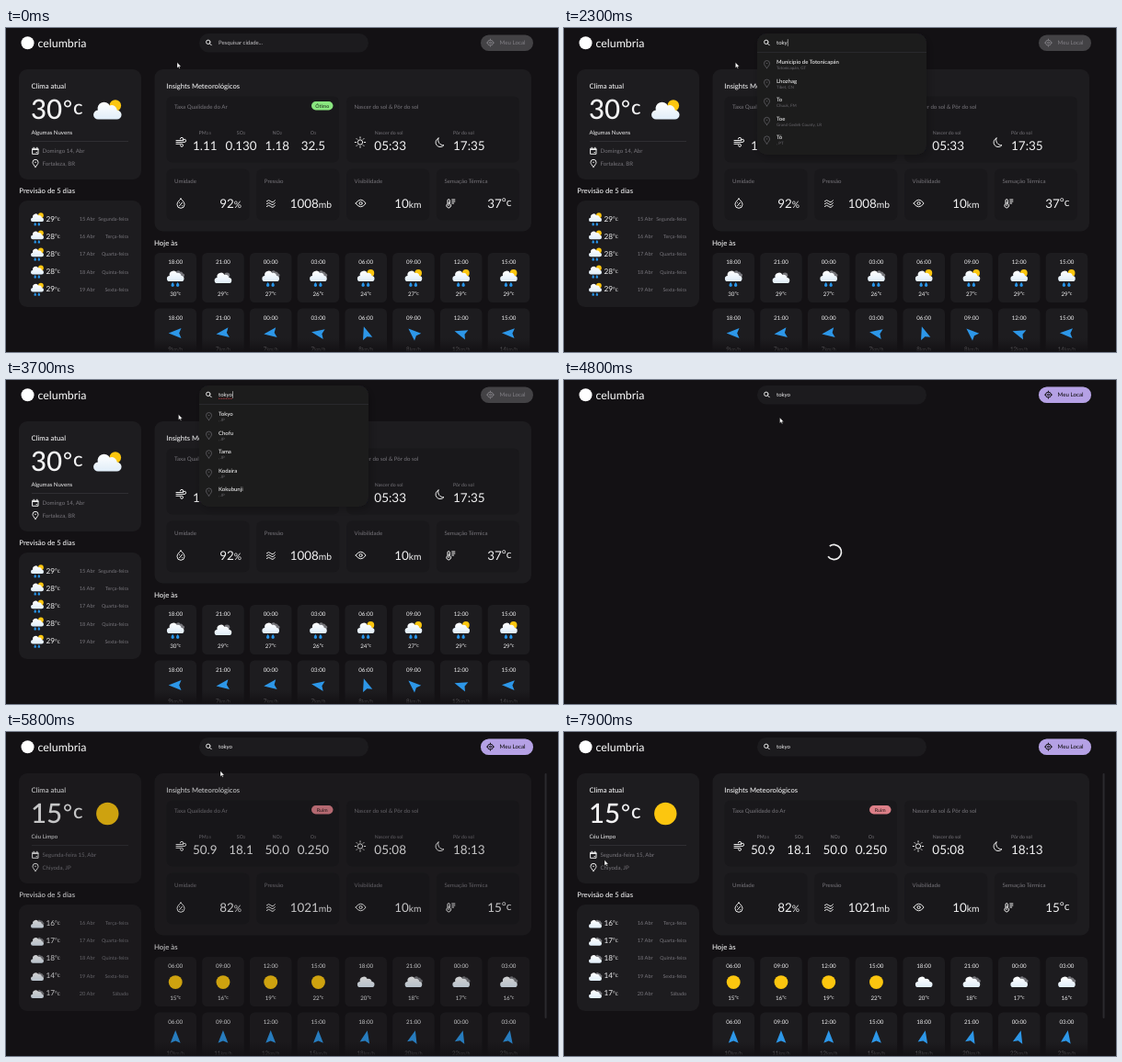
An HTML page for the animation above (8000 ms loop, 600x353 px).

```html
<!DOCTYPE html>
<html lang="pt">
<head>
<meta charset="utf-8">
<title>Clima</title>
<style>
html, body { margin: 0; height: 100%; overflow: hidden; background: #131114; }
svg { display: block; width: 100vw; height: 100vh; font-family: Lato, "Open Sans", sans-serif; text-rendering: geometricPrecision; }
.line { fill: none; stroke: #eee; stroke-width: 1; stroke-linecap: round; stroke-linejoin: round; }
</style>
</head>
<body>
<svg id="stage" viewBox="0 0 600 353"></svg>
<script>
const GREY = '#77757b', WHITE = '#f2f2f3', CARD = '#1d1c1f', INNER = '#19181b';
const $ = id => document.getElementById(id);

const text = (x, y, s, size = 6.1, fill = WHITE, more = '') =>
  `<text x="${x}" y="${y}" font-size="${size}" fill="${fill}" ${more}>${s}</text>`;
const mid = 'text-anchor="middle" ', end = 'text-anchor="end" ', bold = 'font-weight="500" ';
const box = (x, y, w, h, r, fill, more = '') =>
  `<rect x="${x}" y="${y}" width="${w}" height="${h}" rx="${r}" fill="${fill}" ${more}/>`;
const dot = (x, y, r, fill) => `<circle cx="${x}" cy="${y}" r="${r}" fill="${fill}"/>`;
const unit = (s, size, up = 0) => `<tspan font-size="${size}" dy="${-up}">${s}</tspan>`;
const icon = (x, y, d, more = '') => `<path class="line" transform="translate(${x} ${y})" d="${d}" ${more}/>`;
const ring = r => `<circle r="${r}" class="line" pathLength="100" stroke-dasharray="75 25" transform="rotate(-45)" style="stroke-linecap:butt;stroke-width:${r / 4.6}"/>`;

const PIN = 'M0 4C-2 1.5-3 .3-3-1.2a3 3 0 0 1 6 0C3 .3 2 1.5 0 4zM-.4-1.2h.8';
const GLYPH = {
  search: 'M2.8 2.8L1 1M1.5-.7a2.2 2.2 0 1 1-4.4 0 2.2 2.2 0 0 1 4.4 0',
  locate: 'M3 0a3 3 0 1 1-6 0 3 3 0 0 1 6 0M1 0a1 1 0 1 1-2 0 1 1 0 0 1 2 0M0-4v1M0 3v1M-4 0h1M3 0h1',
  date: 'M-3-2.7h6v6h-6zM-3-1.5h6M-1.8-3.8v1M1.8-3.8v1M1 1.6h.6',
  wind: 'M-5-1.5h6a1.6 1.6 0 1 0-1.6-1.6M-5 .4h9a1.6 1.6 0 1 0-1.6-1.6M-5 2.3h6a1.5 1.5 0 1 1-1.5 1.5',
  sun: 'M2.7 0a2.7 2.7 0 1 1-5.4 0 2.7 2.7 0 0 1 5.4 0M0-5.7v1.2M0 4.5v1.2M-5.7 0h1.2M4.5 0h1.2M-4-4l.8.8M3.2 3.2l.8.8M4-4l-.8.8M-3.2 3.2l-.8.8',
  moon: 'M-1-5A5 5 0 1 0 5 2.6 5.6 5.6 0 0 1-1-5z',
  drop: 'M0-5C2.8-2.3 4-.6 4 1.3a4 4 0 0 1-8 0C-4-.6-2.8-2.3 0-5zM-1.5 2.8l3-3.6M-1.5-.7h.1M1.5 2.6h.1',
  waves: [-2.8, 0, 2.8].map(y => `M-4.5 ${y + .6}q2.2-2.4 4.5 0t4.5-1`).join(''),
  eye: 'M-5.5 0Q-3-3.8 0-3.8T5.5 0Q3 3.8 0 3.8T-5.5 0M1.6 0a1.6 1.6 0 1 1-3.2 0 1.6 1.6 0 0 1 3.2 0',
  thermo: 'M-3.4 .4v-3.6a1.2 1.2 0 0 1 2.4 0v3.6a2.4 2.4 0 1 1-2.4 0M-2.2-1v3.6M1.3-4h3.2M1.3-2h3.2M1.3 0h2'
};

const CLOUD = 'M-10 10a5 5 0 0 1-.5-10A7 7 0 0 1 2.5-5 6 6 0 0 1 10.5 0 5 5 0 0 1 10 10z';
const cloud = (fill, more = '') => `<path d="${CLOUD}" fill="${fill}" ${more}/>`;
const front = cloud('url(#cloud)');
const drops = [-5, 4].map(x => `<path d="M${x} 11.5c4 4.5 3.2 8 0 8s-4-3.5 0-8" fill="#2795ea"/>`).join('');
const behind = cloud('#77777c', 'transform="translate(7 -4) scale(.6)"');
const sunny = dot(8.5, -5, 6.3, '#fcc60f');
const SKY = {
  clear: dot(0, 1, 12.2, '#fcc60f'),
  cloud: front,
  broken: behind + front,
  fewDay: sunny + front,
  fewNight: dot(7, -4, 5, '#77777c') + front,
  rainDay: sunny + front + drops,
  rainNight: behind + front + drops
};
const sky = (kind, x, y, scale) => `<g transform="translate(${x} ${y}) scale(${scale})">${SKY[kind]}</g>`;

function page(d) {
  let s = [[14, 45, 133, 120], [14, 188, 133, 116], [161.5, 45, 409.5, 176.5]]
    .map(b => box(...b, 9, CARD)).join('');

  // current weather
  s += text(27.5, 66.2, 'Clima atual', 7.7, WHITE, bold)
    + text(27, 99.3, d.temp, 29.5, WHITE, bold) + text(62, 95.5, '°', 24, WHITE, bold) + text(73, 93.5, 'c', 22, WHITE, bold)
    + sky(d.sky, 110.3, d.sky == 'clear' ? 88 : 89.5, 1)
    + text(27.5, 116, d.desc, 6.1) + box(28, 123, 105, .8, 0, '#343337')
    + icon(32, 134, GLYPH.date) + text(39.5, 136.3, d.date, 6.15, GREY)
    + icon(32, 147.5, PIN) + text(39.5, 149.7, d.place, 6.15, GREY);

  // five day forecast
  s += text(14.3, 180, 'Previsão de 5 dias', 7.7, WHITE, bold);
  d.days.forEach((temp, i) => {
    const y = 208 + 19.1 * i;
    s += sky(d.daySky, 34, d.daySky == 'broken' ? y + 1 : y - 1.5, .46)
      + text(43.5, y + 2.9, temp + unit('°c', 6.5, .8), 8.2)
      + text(79.7, y + 2.2, `${d.first + i} Abr`, 5.7, GREY)
      + text(133, y + 2.2, d.names[i], 5.4, GREY, end);
  });

  // insights
  s += text(174.3, 66.2, 'Insights Meteorológicos', 7.6, WHITE, bold)
    + box(174.5, 74.5, 187.5, 72, 6, INNER) + box(370, 74.5, 188, 72, 6, INNER)
    + text(183, 87.7, 'Taxa Qualidade do Ar', 6.2, GREY)
    + text(378.5, 87.7, 'Nascer do sol &amp; Pôr do sol', 6.1, GREY)
    + box(332, 80, 23.5, 9.4, 4.7, d.badge[1]) + text(343.7, 86.5, d.badge[0], 5.3, d.badge[2], mid + bold)
    + icon(190, 124, GLYPH.wind);
  ['PM' + unit('2.5', 3.8), 'SO' + unit('2', 3.8), 'NO' + unit('2', 3.8), 'O' + unit('3', 3.8)].forEach((label, i) => {
    const x = 216.3 + 39.2 * i;
    s += text(x, 115.5, label, 5.3, GREY, mid) + text(x, 133, d.air[i], 13.4, WHITE, mid);
  });
  s += icon(385, 124.5, GLYPH.sun) + text(400.8, 116.3, 'Nascer do sol', 5.2, GREY) + text(400.3, 133, d.sun[0], 13.5)
    + icon(471, 125, GLYPH.moon) + text(486, 116.3, 'Pôr do sol', 5.2, GREY) + text(486, 133, d.sun[1], 13.5);
  [['Umidade', 'drop', '%', 256], ['Pressão', 'waves', 'mb', 354], ['Visibilidade', 'eye', 'km', 451.5], ['Sensação Térmica', 'thermo', '°c', 549.5]]
    .forEach(([label, glyph, u, right], i) => {
      const x = 174.5 + 97.8 * i;
      s += box(x, 153.5, 90, 56, 6, INNER) + text(x + 8.5, 169, label, 6.1, GREY)
        + icon(x + 15.5, 191, GLYPH[glyph])
        + text(right, 195.7, d.stats[i] + unit(u, u == '°c' ? 12 : 10.3, u == '°c' ? 1.6 : 0), 13.4, WHITE, end);
    });

  // hourly
  s += text(161, 237, 'Hoje às', 7.8, WHITE, bold);
  d.temps.forEach((temp, i) => {
    const x = 184.2 + 51.75 * i;
    const hour = String((d.hour + 3 * i) % 24).padStart(2, '0') + ':00';
    const kind = d.skies[i];
    s += box(x - 22.8, 245, 45.6, 54, 5.5, CARD) + box(x - 22.8, 305.5, 45.6, 54, 5.5, CARD)
      + text(x, 257.3, hour, 6.2, WHITE, mid) + text(x, 317.5, hour, 6.2, WHITE, mid)
      + sky(kind, x, kind.startsWith('rain') ? 270 : 272, .61)
      + text(x, 291.7, temp + unit('°c', 5.4, .5), 6.2, WHITE, mid)
      + `<path d="M0-7.5L5.4 6.3 0 4-5.4 6.3z" fill="#2d97e8" transform="translate(${x} 332.5) rotate(${d.wind[i]})"/>`
      + text(x, 351.8, d.speed[i] + unit('km/h', 5.2), 6.2, WHITE, mid);
  });
  return s;
}

const WEEK = ['Segunda', 'Terça', 'Quarta', 'Quinta', 'Sexta'].map(n => n + '-feira');
const local = {
  temp: 30, sky: 'fewDay', desc: 'Algumas Nuvens', date: 'Domingo 14, Abr', place: 'Fortaleza, BR',
  days: [29, 28, 28, 28, 29], names: WEEK, first: 15, daySky: 'rainDay',
  badge: ['Ótimo', '#89e57f', '#1f331f'], air: ['1.11', '0.130', '1.18', '32.5'], sun: ['05:33', '17:35'],
  stats: [92, 1008, 10, 37], hour: 18, temps: [30, 29, 27, 26, 24, 27, 29, 29],
  skies: ['rainNight', 'fewNight', 'rainNight', 'rainNight', 'rainDay', 'rainDay', 'rainDay', 'rainDay'],
  wind: [-90, -98, -98, -80, -18, -48, -72, -88], speed: [9, 7, 7, 7, 8, 8, 12, 14]
};
const remote = {
  temp: 15, sky: 'clear', desc: 'Céu Limpo', date: 'Segunda-feira 15, Abr', place: 'Chiyoda, JP',
  days: [16, 17, 18, 14, 17], names: [...WEEK.slice(1), 'Sábado'], first: 16, daySky: 'broken',
  badge: ['Ruim', '#dc7f88', '#331f1f'], air: ['50.9', '18.1', '50.0', '0.250'], sun: ['05:08', '18:13'],
  stats: [82, 1021, 10, 15], hour: 6, temps: [15, 16, 19, 22, 20, 18, 17, 16],
  skies: ['clear', 'clear', 'clear', 'clear', 'cloud', 'broken', 'broken', 'broken'],
  wind: [0, 0, 0, 0, 12, 15, 15, 10], speed: [10, 11, 12, 15, 18, 20, 22, 23]
};

const list = rows => rows.map(([name, place], i) => {
  const y = 39 + 20.6 * i;
  return icon(220.5, y + .7, PIN, 'style="stroke:#6c6a70;stroke-width:.7"')
    + text(231, y, name, 6, WHITE, bold) + text(231, y + 6, place, 4.5, '#68666c');
}).join('');

$('stage').innerHTML = `
<defs>
  <linearGradient id="cloud" x2="0" y2="1"><stop stop-color="#fff"/><stop offset="1" stop-color="#e0edf8"/></linearGradient>
  <linearGradient id="fade" x2="0" y2="1"><stop stop-color="#131114" stop-opacity="0"/><stop offset="1" stop-color="#131114"/></linearGradient>
  <filter id="shadow" x="-30%" y="-30%" width="160%" height="170%"><feDropShadow dy="3" stdDeviation="5" flood-opacity=".25"/></filter>
</defs>
<rect width="600" height="353" fill="#131114"/>
<g id="before">${page(local)}</g>
<g id="after">${page(remote)}</g>
<rect y="338" width="600" height="15" fill="url(#fade)"/>
${box(585.6, 45, 2, 267, 1, '#2b2a2e', 'id="bar"')}
<g id="loading">${ring(8)}</g>
${dot(23.5, 16.3, 7, '#fff')}${text(34.5, 20.8, 'celumbria', 12.4, '#fff')}
${box(516, 7.5, 57, 17.5, 8.75, '#434245')}
${box(516, 7.5, 57, 17.5, 8.75, '#b5a1e5', 'id="button"')}
<g id="locate">${icon(526.5, 16.1, GLYPH.locate, 'style="stroke:inherit"')}</g>
${text(536.5, 18.3, 'Meu Local', 6.2, '', 'id="label" ' + bold)}
${box(210, 6, 184, 20.5, 10.2, '#1c1b1e')}
<g id="drop">${box(210, 6, 184, 132, 10, '#1c1b1e', 'filter="url(#shadow)"')}${box(210, 26, 184, .7, 0, '#303034')}
  <g id="first">${list([['Municipio de Totonicapán', 'Totonicapán, GT'], ['Lhozhag', 'Tibet, CN'], ['To', 'Chuuk, FM'], ['Toe', 'Grand Gedeh County, LR'], ['Tó', ', PT']])}</g>
  <g id="second">${list(['Tokyo', 'Chofu', 'Tama', 'Kodaira', 'Kokubunji'].map(n => [n, ', JP']))}</g>
</g>
${icon(220.5, 16, GLYPH.search)}
${text(231, 18.2, '', 6, WHITE, 'id="query"')}
<path id="spell" d="M231 20.2h15" stroke="#d8434a" stroke-width=".8" stroke-dasharray="1 .6"/>
<rect id="caret" y="12.2" width=".6" height="7.6" fill="#ddd"/>
<g id="busy">${ring(4)}</g>
<path id="cursor" d="M0 0v6l1.4-1.3 1 2.1 .9-.4-1-2h1.9z" fill="#fff" stroke="#000" stroke-width=".3"/>`;

const KEYS = [1200, 1500, 2050, 2250, 2450];
const FOUND = 2000, REFINED = 2950, CLICK = 4450, READY = 5600;
const PATH = [[0, 186, 37.5], [3650, 186.5, 37.5], [4250, 235, 41], [5400, 234, 41], [5700, 233, 42.5], [6700, 233, 42.5], [7600, 44, 139.5], [8000, 44, 139.5]];
const show = (id, on) => $(id).style.display = on ? '' : 'none';
const spin = (id, x, y, angle) => $(id).setAttribute('transform', `translate(${x} ${y}) rotate(${angle})`);
const ramp = (t, start, length) => Math.min(1, Math.max(0, (t - start) / length));

function pointer(t) {
  const i = PATH.findIndex(p => p[0] > t);
  const [t0, x0, y0] = PATH[i - 1], [t1, x1, y1] = PATH[i];
  const u = ramp(t, t0, t1 - t0), e = u * u * (3 - 2 * u);
  return [x0 + (x1 - x0) * e, y0 + (y1 - y0) * e];
}

function draw() {
  const t = performance.now() % 8000;
  const typed = KEYS.filter(k => k <= t).length;
  const clicked = t >= CLICK, ready = t >= READY;

  show('before', !clicked);
  show('after', ready);
  $('after').style.opacity = ramp(t, READY, 250);
  show('loading', clicked && !ready);
  spin('loading', 293.5, 187.5, (t - 5400) * .72 - 10);
  show('bar', ready);

  const ink = clicked ? '#131114' : '#7d7b80';
  $('button').style.opacity = ramp(t, CLICK + 50, 150);
  $('label').setAttribute('fill', ink);
  $('locate').style.stroke = ink;

  $('query').textContent = typed ? 'tokyo'.slice(0, typed) : 'Pesquisar cidade...';
  $('query').setAttribute('fill', typed ? WHITE : '#c5c4c7');
  const blink = typed ? Math.floor((t - KEYS[typed - 1]) / 500) % 2 == 0 : t % 1000 >= 500;
  show('caret', blink && !clicked);
  $('caret').setAttribute('x', typed ? 231.2 + $('query').getComputedTextLength() : 230.6);
  show('spell', t >= REFINED && !clicked);
  show('busy', t >= KEYS[0] && t < FOUND);
  spin('busy', 383.5, 16, (t - 1300) * .72 + 45);

  show('drop', t >= FOUND && !clicked);
  show('first', t < REFINED);
  show('second', t >= REFINED);
  $('cursor').setAttribute('transform', `translate(${pointer(t)})`);
  requestAnimationFrame(draw);
}
draw();
</script>
</body>
</html>
```
